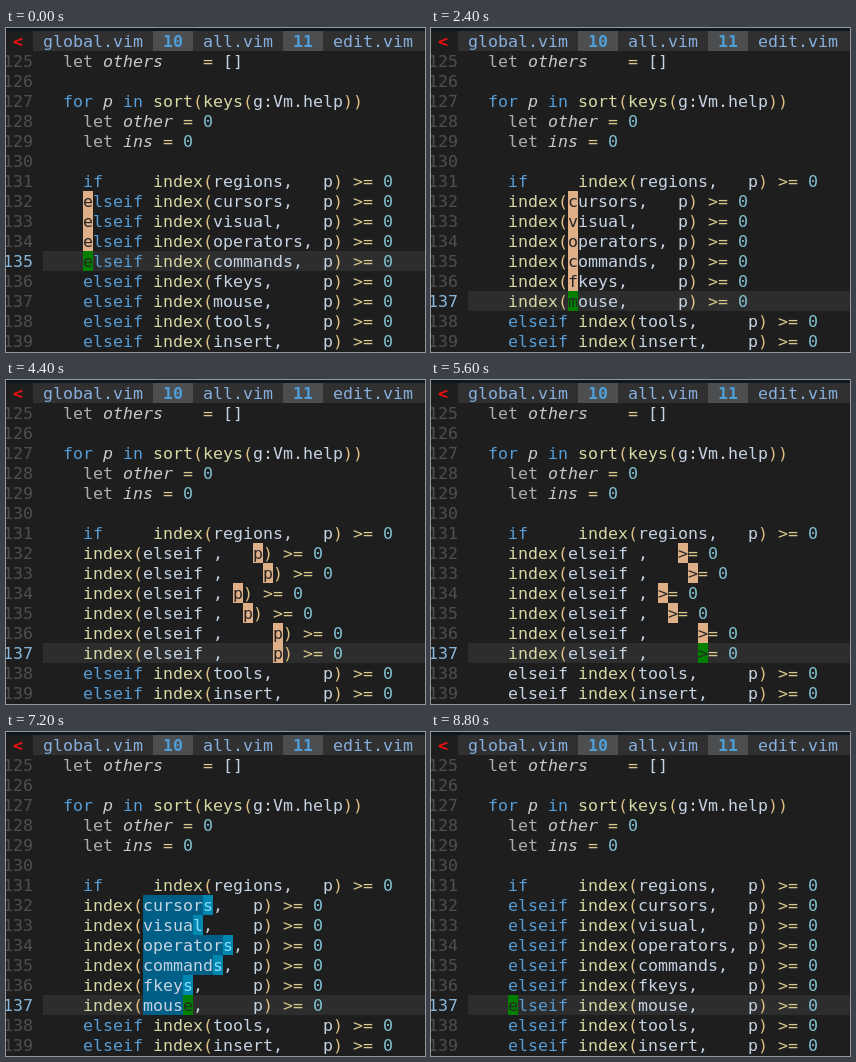
An HTML page that plays this animation: 419x324 px, repeating every 9.2 s.

```html
<!DOCTYPE html>
<html lang="en">
<head>
<meta charset="utf-8">
<title>Multiple cursors in an editor</title>
<style>
  html, body { margin: 0; width: 100%; height: 100%; overflow: hidden; background: #1e1e1e; }
  svg { display: block; width: 419px; height: 324px; }
  text { font-family: "DejaVu Sans Mono", monospace; font-size: 16.61px; white-space: pre; }
  .bold { font-weight: bold; }
  .italic { font-style: italic; }
</style>
</head>
<body>
<svg id="stage" viewBox="0 0 419 324"></svg>
<script>
const stage = document.getElementById('stage');
const LOOP = 9200, STEP = 400, CELL = 10, ROW = 20, LEFT = 37, WIDTH = 419;
const FIRST = 132, LAST = 137;
const words = ['regions', 'cursors', 'visual', 'operators', 'commands',
               'fkeys', 'mouse', 'tools', 'insert'];

const color = {
  back: '#1e1e1e', line: '#2d2d2d', number: '#4e4e4e', current: '#87b5d7',
  keyword: '#569cd6', let: '#adadad', func: '#d7d7a5', paren: '#dfc080',
  op: '#d7c78c', digit: '#7fbfcf', name: '#c5d3e3', variable: '#c8c8c8',
  main: '#008000', mono: '#dfaf87', dark: '#262626',
  extend: '#005f87', tip: '#0087af', tipText: '#87dfff', match: '#4e4e4e',
  edge: '#0c1a1e', bar: '#303030', tab: '#4c4e50', title: '#87afdf',
  tabNumber: '#4f9fd8', arrow: '#f01010'
};

const colX = col => LEFT + col * CELL;
const rowY = number => 3 + (number - 124) * ROW;
const escape = s => s.replace(/&/g, '&amp;').replace(/</g, '&lt;').replace(/>/g, '&gt;');

function box(x, y, w, fill, h = ROW) {
  return `<rect x="${x}" y="${y}" width="${w}" height="${h}" fill="${fill}"/>`;
}

function label(x, y, s, fill, style = '') {
  return `<text x="${x}" y="${y + 16}" fill="${fill}" class="${style}">${escape(s)}</text>`;
}

// Everything that depends on the 400 ms step
function stateAt(step) {
  const between = (a, b) => step >= a && step <= b;
  let text = 'plain';
  if (between(4, 7) || step === 18) text = 'cut';
  else if (between(8, 13) || step === 17) text = 'swapped';
  else if (step === 14) text = 'open';
  else if (between(15, 16)) text = 'aligned';

  let spot = 4;
  if (step === 5) spot = 9;
  else if (step === 6 || step === 9) spot = 10;
  else if (step === 10) spot = 17;
  else if (between(11, 13) || step === 17) spot = 'p';
  else if (between(14, 16)) spot = '>';

  return {
    text, spot,
    current: Math.min(135 + step, LAST),
    selecting: step === 7 || step === 8 || step === 18,
    multi: step < 20,
    lit: step % 2 === 0 || step === 19,
    matching: step === 5,
    unclosed: between(14, 16)
  };
}

function branchText(number, mode) {
  const word = words[number - 131];
  const call = 'index(' + (word + ',').padEnd(11) + 'p) >= 0';
  if (number === 131) return '    if     ' + call;
  if (mode === 'plain' || number > LAST) return '    elseif ' + call;
  if (mode === 'cut') return '    ' + call;
  const head = '    index(elseif ,';
  if (mode === 'aligned') return head.padEnd(23) + '>= 0';
  return head + ' '.repeat(10 - word.length) + (mode === 'open' ? '' : 'p) ') + '>= 0';
}

function lineText(number, mode) {
  if (number >= 131) return branchText(number, mode);
  return {
    125: '  let others    = []',
    127: '  for p in sort(keys(g:Vm.help))',
    128: '    let other = 0',
    129: '    let ins = 0'
  }[number] || '';
}

function tokenColor(token, first, unclosed) {
  if (token === 'let') return color.let;
  if (/^(for|in)$/.test(token) || (first && !unclosed && /^(if|elseif)$/.test(token)))
    return color.keyword;
  if (/^(index|sort|keys)$/.test(token)) return color.func;
  if (/^[()]$/.test(token)) return color.paren;
  if (/^[>=]+$/.test(token)) return color.op;
  if (/^\d+$/.test(token)) return color.digit;
  return color.name;
}

function drawCode(number, text, unclosed) {
  let out = '', first = true, previous = '';
  for (const hit of text.matchAll(/[a-z:.]+|\d+|>=|\S/gi)) {
    const token = hit[0];
    const declared = previous === 'let' || previous === 'for';
    const fill = declared ? color.variable : tokenColor(token, first, unclosed);
    out += label(colX(hit.index), rowY(number), token, fill, declared ? 'italic' : '');
    first = false;
    previous = token;
  }
  return out;
}

function drawCell(number, col, char, back, fill) {
  return box(colX(col), rowY(number), CELL, back) + label(colX(col), rowY(number), char, fill);
}

function drawCursor(number, text, state, col) {
  const main = number === state.current;
  if (main && state.lit) return drawCell(number, col, text[col], color.main, color.dark);
  if (!state.multi) return '';
  return state.selecting
    ? drawCell(number, col, text[col], color.tip, color.tipText)
    : drawCell(number, col, text[col], color.mono, color.dark);
}

function drawLine(number, state) {
  const text = lineText(number, state.text), y = rowY(number);
  const active = number === state.current;
  let under = active ? box(LEFT, y, WIDTH - LEFT, color.line) : '';
  let over = '';

  if (number >= FIRST && number <= state.current) {
    let col = state.spot;
    if (state.selecting) {
      const size = state.text === 'cut' ? words[number - 131].length : 7;
      under += box(colX(10), y, size * CELL, color.extend);
      col = 9 + size;
    } else if (typeof col === 'string') {
      col = text.indexOf(col);
    }
    over = drawCursor(number, text, state, col);
  }
  if (active && state.matching)
    under += box(colX(text.indexOf(')')), y, CELL, color.match);

  return under
    + label(-3, y, String(number), active ? color.current : color.number)
    + drawCode(number, text, state.unclosed && number > LAST)
    + over;
}

function drawTabs() {
  let out = box(0, 0, WIDTH, color.edge, 3) + box(27, 3, WIDTH - 27, color.bar)
    + label(7, 3, '<', color.arrow, 'bold');
  for (const [x, name] of [[37, 'global.vim'], [197, 'all.vim'], [327, 'edit.vim']])
    out += label(x, 3, name, color.title);
  for (const [x, tab] of [[147, '10'], [277, '11']])
    out += box(x, 3, 40, color.tab) + label(x + CELL, 3, tab, color.tabNumber, 'bold');
  return out;
}

function draw(step) {
  const state = stateAt(step);
  let out = box(0, 0, WIDTH, color.back, 324) + drawTabs();
  for (let number = 125; number <= 139; number++) out += drawLine(number, state);
  stage.innerHTML = out;
}

const start = performance.now();
let shown = 0;
function tick() {
  const step = Math.floor(((performance.now() - start) % LOOP) / STEP);
  if (step !== shown) draw(shown = step);
  requestAnimationFrame(tick);
}
draw(0);
requestAnimationFrame(tick);
</script>
</body>
</html>
```
